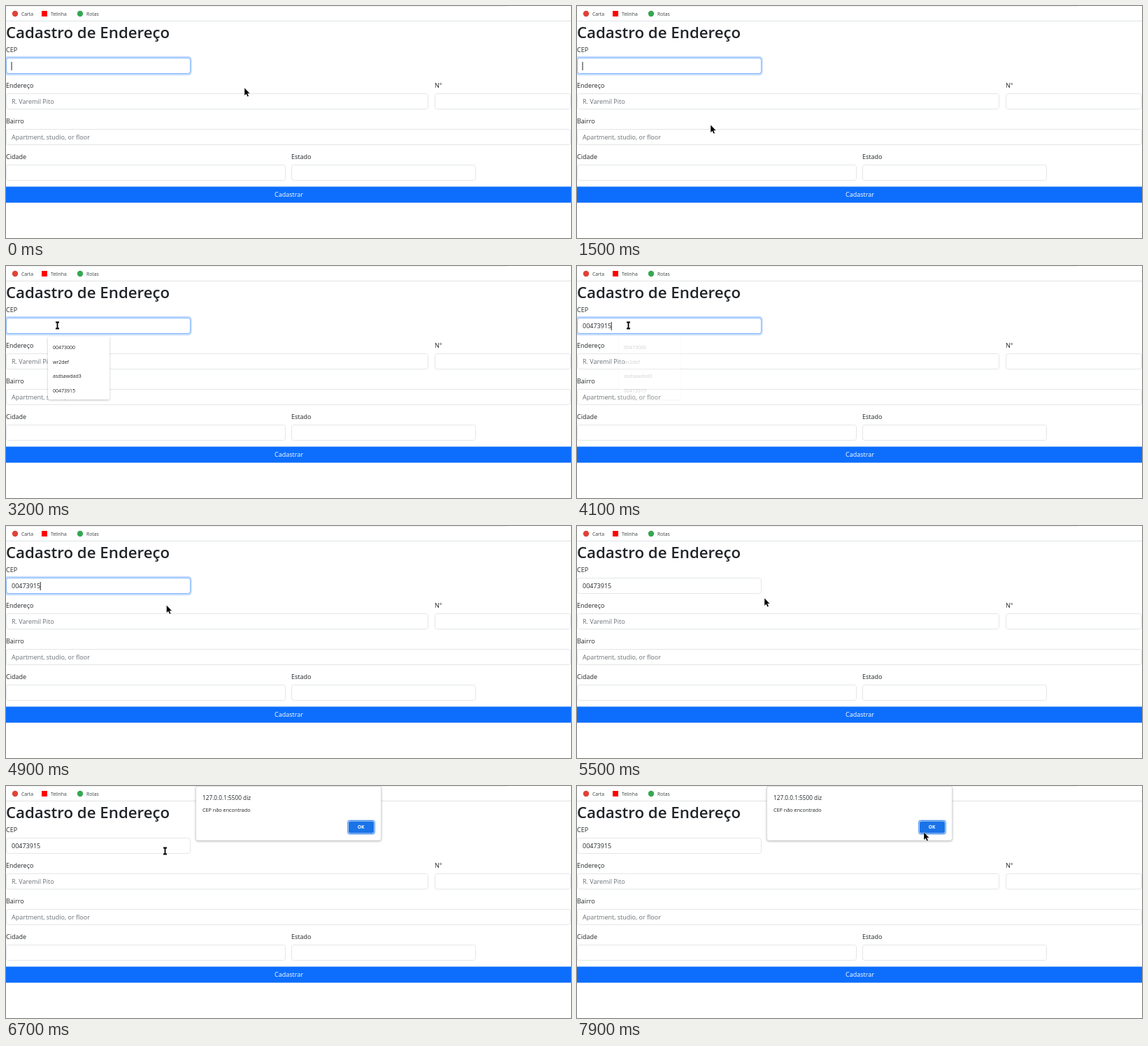
These frames come from a looping animation (808x332 px, 8000 ms). An HTML page:

```html
<!DOCTYPE html>
<html lang="pt-BR">
<head>
<meta charset="utf-8">
<title>Cadastro de Endereço</title>
<style>
  html, body { margin: 0; width: 100%; height: 100%; overflow: hidden; background: #fff; }
  svg { display: block; width: 808px; height: 332px; font: 9px "Open Sans", "Noto Sans", sans-serif; fill: #212529; }
  .field { fill: #fff; stroke: #e3e6e9; }
  .hint { fill: #6b7075; }
  .small { font-size: 6.8px; fill: #3c4043; }
  .popup { fill: #fff; filter: drop-shadow(0 1px 1.5px rgba(0, 0, 0, .25)); }
</style>
</head>
<body>
<svg viewBox="0 0 808 332">
  <path d="M0 .5H716" stroke="#f0f0f0"/>
  <path d="M0 21.5H808" stroke="#dfe1e3"/>
  <circle cx="13" cy="11" r="4.2" fill="#e04234"/>
  <rect x="51" y="7" width="8" height="8" fill="#f00"/>
  <circle cx="106" cy="11" r="4.2" fill="#34a853"/>
  <g class="small">
    <text x="22" y="13.5">Carta</text>
    <text x="64" y="13.5">Telinha</text>
    <text x="115" y="13.5">Rotas</text>
  </g>

  <text y="46" font-size="22.25" font-weight="600">Cadastro de Endereço</text>
  <g id="form"></g>
  <g id="focus" fill="none">
    <rect x="-1" y="73" width="265.5" height="25" rx="4" stroke="#c2dbfe" stroke-width="2.4"/>
    <rect x=".5" y="74.5" width="263" height="22" rx="3" stroke="#86b7fe"/>
  </g>
  <text id="code" x="8" y="89.2">00473915</text>
  <rect id="caret" y="80" width="1" height="12"/>
  <rect y="258.5" width="808" height="23" fill="#0d6efd"/>
  <text x="404.4" y="273.2" text-anchor="middle" fill="#fff">Cadastrar</text>

  <g id="list" font-size="7">
    <rect class="popup" x="60" y="101" width="88" height="90" rx="2"/>
  </g>

  <g id="alert">
    <rect class="popup" x="271.5" y=".5" width="265" height="77.5" rx="3" stroke="#d0d2d4" stroke-width=".7"/>
    <text x="281" y="20.3" font-size="8.25">127.0.0.1:5500 diz</text>
    <text x="281" y="37.3" font-size="7.25">CEP não encontrado</text>
    <rect x="488.8" y="49.3" width="38.4" height="19.4" rx="2.5" fill="#fff" stroke="#1a73e8"/>
    <rect x="490" y="50.5" width="36" height="17" rx="2" fill="#1a73e8"/>
    <text x="507.6" y="61.3" font-size="6.6" font-weight="700" text-anchor="middle" fill="#fff">OK</text>
  </g>

  <g id="mouse">
    <path id="arrow" d="M0 0V11.2L2.5 8.9L4.3 12.8L6.2 12L4.5 8.2H7.8Z" fill="#000" stroke="#fff" stroke-width=".4"/>
    <path id="beam" d="M-2.5 -4.5H2.5M0 -4.5V4.5M-2.5 4.5H2.5" fill="none" stroke="#000" stroke-width="1.8"/>
  </g>
</svg>
<script>
const $ = id => document.getElementById(id);
const show = (id, on) => $(id).setAttribute("opacity", +on);
const clamp = k => Math.max(0, Math.min(1, k));

const H = 23, rowTop = row => 74 + 51 * row;

// label, row, x, width, placeholder
const fields = [
  ["CEP", 0, 0, 264, ""],
  ["Endereço", 1, 0, 604, "R. Varemil Pito"],
  ["N°", 1, 613, 195, ""],
  ["Bairro", 2, 0, 808, "Apartment, studio, or floor"],
  ["Cidade", 3, 0, 400, ""],
  ["Estado", 3, 408, 264, ""]
];
$("form").innerHTML = fields.map(([label, row, x, w, hint]) => {
  const y = rowTop(row);
  return `<text x="${x}" y="${y - 8}">${label}</text>
    <rect class="field" x="${x + .5}" y="${y + .5}" width="${w - 1}" height="${H - 1}" rx="3"/>
    <text class="hint" x="${x + 8}" y="${y + 15.2}">${hint}</text>`;
}).join("");

$("list").innerHTML += ["00473000", "wr2def", "asdsawdad3", "00473915"]
  .map((s, i) => `<text x="67" y="${119 + 20.5 * i}">${s}</text>`).join("");

// start, duration and destination of each hand movement
const moves = [
  [0, 300, 400, 42], [300, 300, 404, 254], [600, 300, 283, 174], [900, 600, 191, 170],
  [1500, 1000, 73.5, 85], [4100, 700, 219, 90], [4800, 300, 234, 123], [5100, 400, 268, 103],
  [6000, 700, 227.5, 93], [7000, 900, 496, 66]
];

function pointer(t) {
  let x = 341, y = 117;
  for (const [start, span, toX, toY] of moves) {
    const k = 1 - (1 - clamp((t - start) / span)) ** 3;
    x += (toX - x) * k;
    y += (toY - y) * k;
  }
  return [x, y];
}

const OPEN = 2700, FILL = 3700, PICK = 4000, BLUR = 5100, ALERT = 6000, BLINK = 530;
const lit = t => Math.floor(t / BLINK) % 2 === 0;

function caretOn(t) {
  if (t >= BLUR) return false;
  if (t >= FILL) return lit(t - FILL);
  return t < OPEN ? lit(t + 30) : t < 3200;
}

function draw(now) {
  const t = Math.floor(now % 8000 / 100) * 100; // the screen updates ten times a second
  const [x, y] = pointer(t);
  const overField = fields.some(([, row, fx, w]) =>
    x >= fx && x <= fx + w && y >= rowTop(row) && y <= rowTop(row) + H);
  const overAlert = t >= ALERT && x > 271 && x < 537 && y < 78;
  const typing = overField && !overAlert;
  $("mouse").setAttribute("transform", `translate(${x} ${y})`);
  show("beam", typing);
  show("arrow", !typing);

  show("code", t >= FILL);
  show("caret", caretOn(t));
  $("caret").setAttribute("x", t < FILL ? 7.5 : 48.7);
  show("focus", clamp(1 - (t - BLUR) / 150));
  show("list", t < OPEN ? 0 : clamp(1 - (t - PICK) / 125));
  show("alert", t >= ALERT);
}

const start = performance.now();
function loop() {
  draw(performance.now() - start);
  requestAnimationFrame(loop);
}
loop();
</script>
</body>
</html>
```
